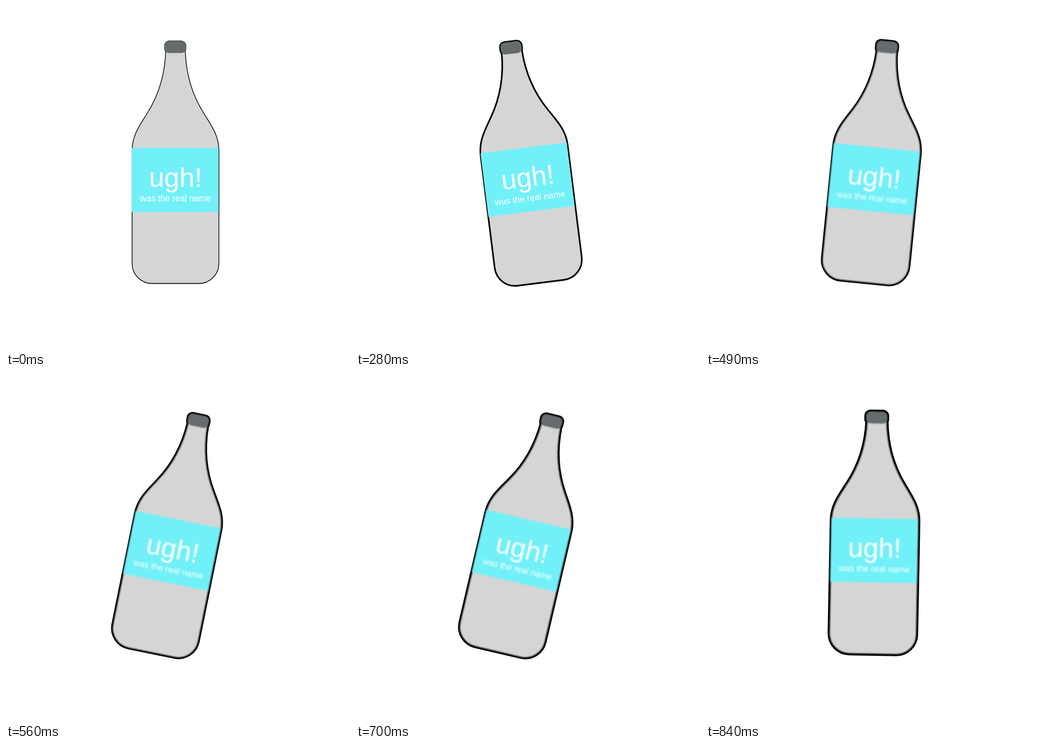
An HTML page with a canvas that plays this animation: 618 px wide and 618 px high, repeating every 910 ms.

```html
<!DOCTYPE html>
<html lang="en">
<head>
<meta charset="utf-8">
<title>Wobbling bottle</title>
<style>
  html, body { margin: 0; width: 100%; height: 100%; overflow: hidden; background: #fff; }
  canvas { display: block; }
</style>
</head>
<body>
<canvas id="stage" width="618" height="618"></canvas>
<script>
const SIZE = 618, STEPS = 13, HOLD = 70;
const PIVOT = { x: 304.5, y: 280.5 };

// Turning points of the swing, linear in between
const SWING = [
  { at: 0, angle: 0, x: 0, y: 0 },
  { at: 3, angle: -10.7, x: 0, y: 0 },
  { at: 6, angle: 0, x: 0.6, y: -1 },
  { at: 9, angle: 17.2, x: 0.3, y: -1 },
  { at: 10, angle: 13.2, x: 0.3, y: -1 },
  { at: 12, angle: 1.1, x: -1.2, y: -2.8 }
];

const ctx = document.getElementById('stage').getContext('2d');
const layer = document.createElement('canvas');
layer.width = layer.height = SIZE;
const art = layer.getContext('2d');

const body = new Path2D(`M287 80 C285.5 130 270 167 253.5 193 C240 215 227 232 226.5 258
  V462.5 A36 36 0 0 0 262.5 498.5 H346.5 A36 36 0 0 0 382.5 462.5
  V258 C382 232 369 215 355.5 193 C339 167 323.5 130 322 80 Z`);
const cap = new Path2D();
cap.roundRect(285, 63, 38, 21.5, 8);

function poseAt(step) {
  const i = Math.max(1, SWING.findIndex(key => key.at >= step));
  const a = SWING[i - 1], b = SWING[i];
  const mix = name => a[name] + (b[name] - a[name]) * (step - a.at) / (b.at - a.at);
  return { angle: mix('angle'), x: mix('x'), y: mix('y') };
}

function place(c, pose) {
  c.translate(PIVOT.x + pose.x, PIVOT.y + pose.y);
  c.rotate(pose.angle * Math.PI / 180);
  c.translate(-PIVOT.x, -PIVOT.y);
}

function shape(c, path, fill, width) {
  c.fillStyle = fill;
  c.strokeStyle = '#000';
  c.lineWidth = width;
  c.lineJoin = 'round';
  c.fill(path);
  if (width) c.stroke(path);
}

function text(c, string, size, x, y) {
  c.font = `${size}px "Liberation Sans", Arial, sans-serif`;
  c.textAlign = 'center';
  c.fillStyle = '#fff';
  c.fillText(string, x, y);
}

function bottle(c) {
  shape(c, cap, '#000', 2);
  shape(c, body, '#d5d5d5', 1.3);
  shape(c, cap, '#666b6d', 0);
  c.fillStyle = '#72f0f8';
  c.fillRect(226, 255, 156, 115);
  text(c, 'ugh!', 49, 304.7, 325);
  text(c, 'was the real name', 15.6, 304.5, 351);
}

function draw(step) {
  const pose = poseAt(step);
  const spread = Math.sqrt(step);   // outline and softness grow with each turn

  art.clearRect(0, 0, SIZE, SIZE);
  art.save();
  place(art, pose);
  bottle(art);
  art.restore();

  ctx.clearRect(0, 0, SIZE, SIZE);
  ctx.save();
  place(ctx, pose);
  for (const path of [body, cap]) shape(ctx, path, '#000', 1.3 + 1.55 * spread);
  ctx.restore();

  ctx.save();
  ctx.globalCompositeOperation = 'source-atop';
  if (step) ctx.filter = `blur(${0.36 * spread}px)`;
  ctx.drawImage(layer, 0, 0);
  ctx.restore();
}

let shown = -1;
const start = performance.now();
function tick() {
  const step = Math.floor((performance.now() - start) / HOLD) % STEPS;
  if (step !== shown) draw(shown = step);
  requestAnimationFrame(tick);
}
tick();
</script>
</body>
</html>
```
